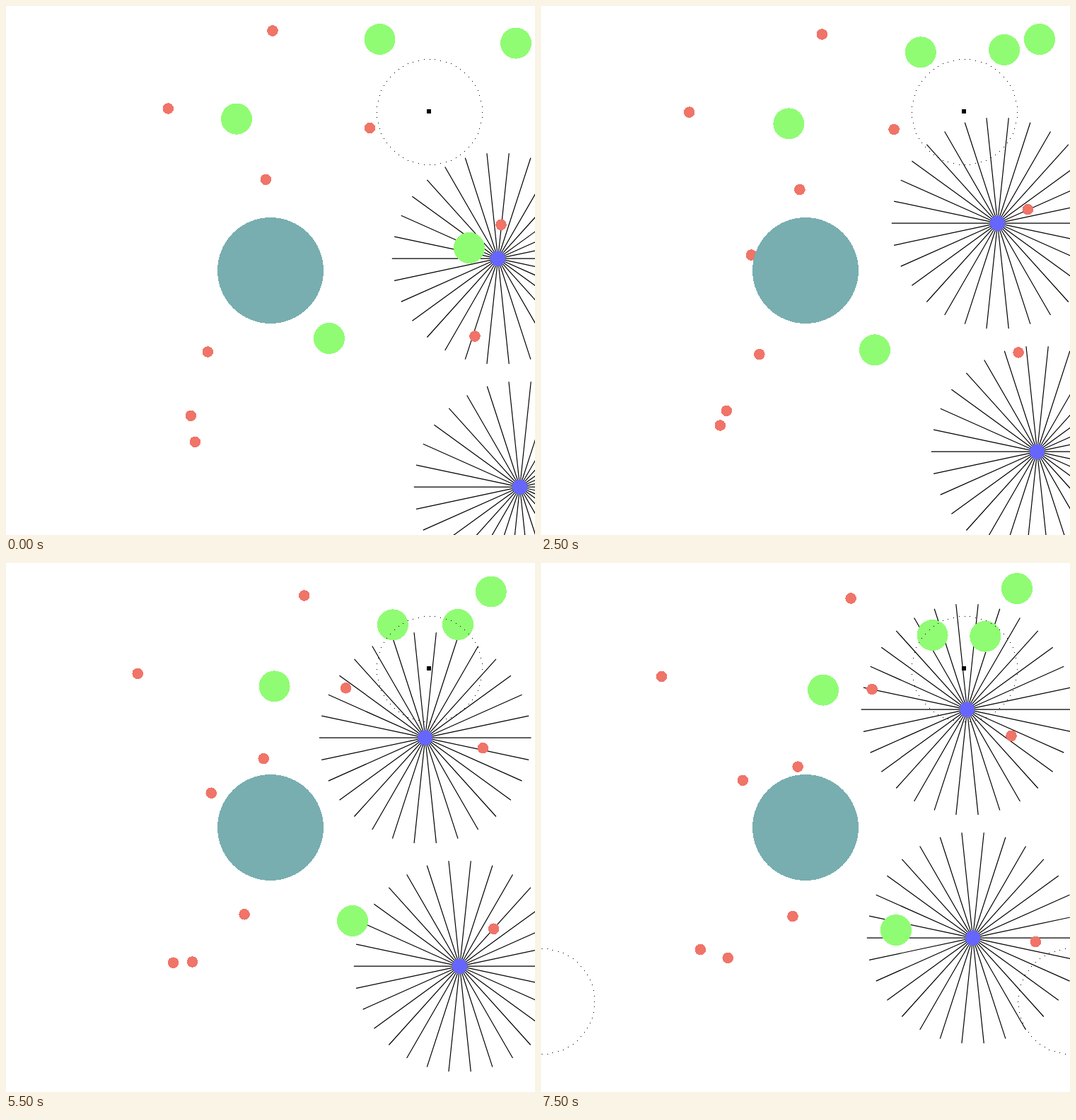
Write an HTML page that moves like this. It is 748 px wide and 748 px high and loops after 8000 ms.

```html
<!DOCTYPE html>
<html>
<head>
<meta charset="utf-8">
<style>
  html, body { margin: 0; width: 100%; height: 100%; overflow: hidden; background: #fff; }
  svg { display: block; width: 748px; height: 748px; }
</style>
</head>
<body>
<svg id="stage" viewBox="0 0 748 748" shape-rendering="crispEdges"></svg>
<script>
const stage = document.getElementById('stage');
const STEP = 500, STEPS = 16;
const RED = '#f07468', GREEN = '#90fc74', BLUE = '#6666ff', TEAL = '#78aeb0';

const circle = (x, y, r, fill) => `<circle cx="${x}" cy="${y}" r="${r}" fill="${fill}"/>`;
const square = (x, y, size) => `<rect x="${x}" y="${y}" width="${size}" height="${size}"/>`;
const past = (k, start) => Math.max(0, k - start);
const around = (count, draw) => Array.from({ length: count }, (_, i) => {
  const a = 2 * Math.PI * i / count;
  return draw(Math.cos(a), Math.sin(a));
}).join('');

// A body keeps its velocity per step; it may appear or vanish on the way
const body = (r, fill) => (x, y, vx, vy, from = 0, until = STEPS) => k =>
  k < from || k > until ? '' : circle(x + vx * k, y + vy * k, r, fill);
const red = body(7.8, RED), green = body(22, GREEN);

const bodies = [
  green(528.5, 47, 1.67, 3.67),
  green(721, 52.6, -3.2, -1.1),
  green(326, 159.7, 4.87, 1.33),
  green(457, 470, 3, 3.27),
  green(655, 342, 4, 0, 0, 2),
  green(668.5, 41, -2.68, 4.18, 3),
  red(377, 35, 4.07, 1),
  red(229.3, 145, -3.92, 1.03),
  red(514.6, 172.5, -3.1, 0.4),
  red(367.3, 245.3, -0.28, 2.85),
  red(700, 309.3, -2.33, -4.33),
  red(663, 467, 2.42, 4.57),
  red(285.3, 489, 4.71, 0.71),
  red(261.4, 579.3, 0.19, -1.39),
  red(267.3, 616.3, -2.8, -4.65),
  red(303.5, 374.5, -1.21, -4.48, 3)
];

// Bursts climb steadily and steer sideways, at most 10 px per step
const bursts = [
  k => burst(695.6 - 10 * k + past(k, 7) ** 3 / 9, 357.2 - 10 * k),
  k => burst(751.6 - 10 * k - past(5, k) ** 2 + past(k, 12) ** 2, 680.2 - 10 * k)
];

function burst(x, y) {
  const rays = around(30, (c, s) => `M${x} ${y}L${x + 149.8 * c} ${y + 149.8 * s}`);
  return `<path d="${rays}" stroke="#000" stroke-width="1.2" shape-rendering="geometricPrecision"/>` +
    circle(x, y, 10.8, BLUE);
}

const dottedRing = (x, y) => around(60, (c, s) =>
  square(Math.round(x + 74.5 * c), Math.round(y + 74.5 * s), 1));

function scene(k) {
  return [...bursts, ...bodies].map(draw => draw(k)).join('') +
    circle(374, 374, 75, TEAL) +
    dottedRing(598.5, 149.5) + square(595, 146, 6) +
    (k === STEPS - 1 ? dottedRing(0.8, 619.5) + dottedRing(748.8, 619.5) : '');
}

let shown = -1;
function tick(now) {
  const k = Math.floor(now / STEP) % STEPS;
  if (k !== shown) stage.innerHTML = scene(shown = k);
  requestAnimationFrame(tick);
}
tick(0);
</script>
</body>
</html>
```
